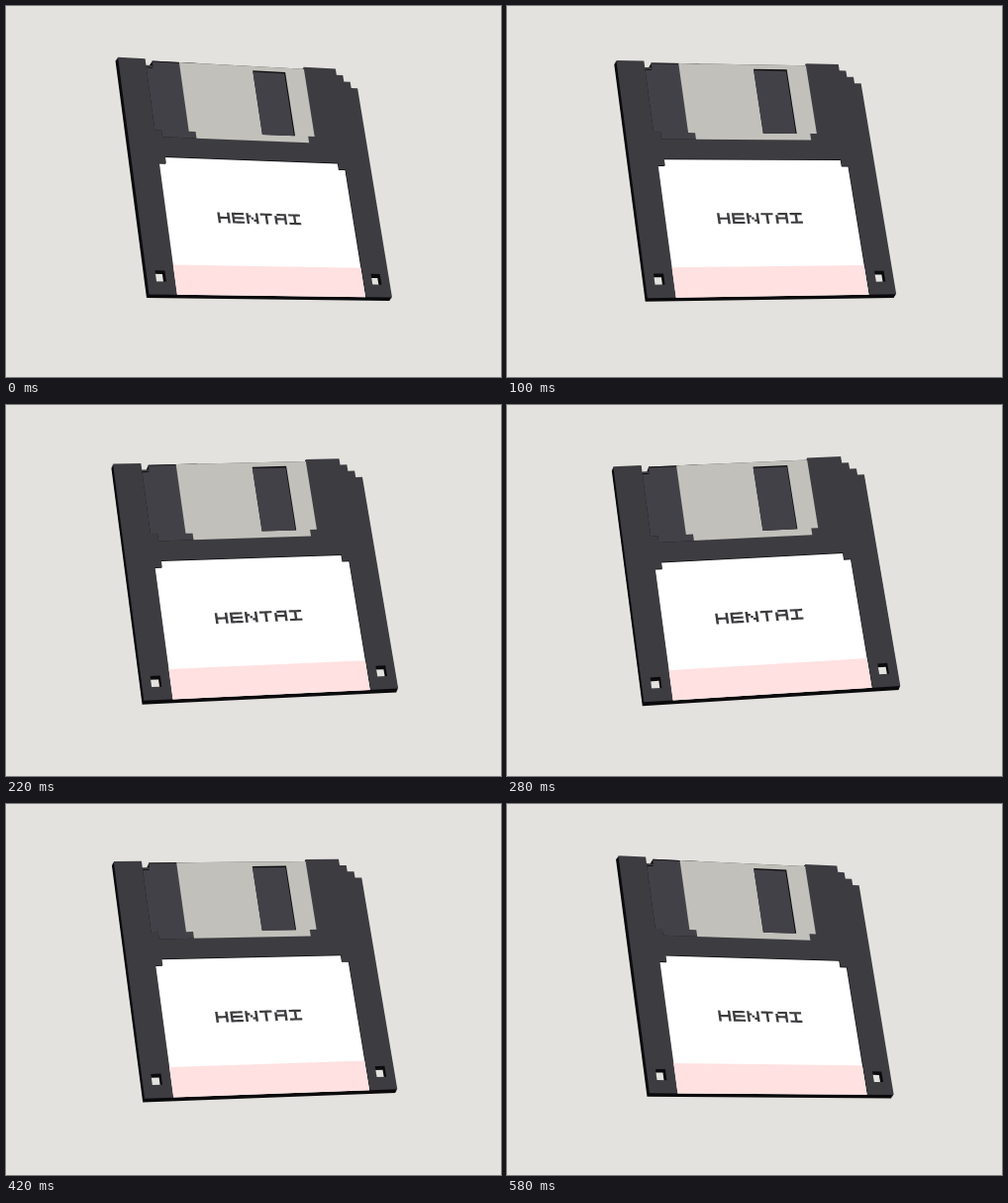
Recreate the animation shown at these times as an HTML page with a canvas. Size 500x375 px, loop 600 ms.

```html
<!DOCTYPE html>
<html lang="en">
<head>
<meta charset="utf-8">
<title>Floppy disk</title>
<style>
  html, body { margin: 0; width: 100%; height: 100%; overflow: hidden; background: #e3e2de; }
  canvas { display: block; width: 500px; height: 375px; }
</style>
</head>
<body>
<canvas id="stage" width="500" height="375" role="img" aria-label="Rocking floppy disk labelled HENTAI"></canvas>
<script>
const ctx = document.getElementById('stage').getContext('2d');
const LOOP = 600, STEP = 20;
const COLS = 36, ROWS = 35.5;
const BACKGROUND = '#e3e2de', PLASTIC = '#3d3c41', INNER = '#434148', SHADE = '#0b0b0d';

// Face corners (clockwise from top left) at both ends of the swing, and the offset to the back face.
const START = { corners: [[113, 51.7], [352, 64.5], [390, 294.5], [144.5, 291.5]], depth: [-2.5, 3.5] };
const END = { corners: [[107.3, 62.2], [357.6, 51.2], [397.3, 284], [138.3, 300.3]], depth: [-1.5, 4] };
const CENTER = [250, 175];

// A rectangle in grid cells; each corner is cut by a staircase of the given number of cells.
function stepped(left, top, right, bottom, cuts = [0, 0, 0, 0]) {
  const corners = [[left, top], [right, top], [right, bottom], [left, bottom]];
  const ways = [[0, -1], [1, 0], [0, 1], [-1, 0]];
  return corners.flatMap(([x, y], i) => {
    const [ix, iy] = ways[i], [ox, oy] = ways[(i + 1) % 4], n = cuts[i];
    const points = [];
    for (let k = 0; k <= n; k++) {
      const px = x - n * ix + k * (ix + ox), py = y - n * iy + k * (iy + oy);
      points.push([px, py]);
      if (k < n) points.push([px + ox, py + oy]);
    }
    return points;
  });
}

const [firstCorner, ...otherCorners] = stepped(0, 0, COLS, ROWS, [0, 3, 0, 0]);
const BODY = [firstCorner, [4, 0], [4, 1], [5, 1], [5, .3], [28, .3], [28, 0], ...otherCorners];
const RECESS = stepped(4, .3, 12, 12, [1, 0, 0, 1]);
const SHUTTER = stepped(9, .3, 28, 12, [0, 0, 1, 1]);
const WINDOW = stepped(20, 1, 25, 11);
const LABEL = stepped(4, 15, 32, ROWS, [1, 1, 0, 0]);
const STRIPE = stepped(4, 31, 32, ROWS);
const HOLES = [1.3, 33.3].map(x => stepped(x, 32, x + 1.4, 33.6));

// Which cells of a 5 by 5 letter are inked.
const INK = {
  H: (x, y) => x % 4 === 0 || y === 2,
  E: (x, y) => x === 0 || y % 2 === 0,
  N: (x, y) => x % 4 === 0 || x === y,
  T: (x, y) => x === 2 || y === 0,
  A: (x, y) => x + y > 0 && (x % 4 === 0 || y === 0 || y === 2),
  I: (x, y) => x === 2 || y % 4 === 0
};

function letterCells(text, left, top, width, height) {
  const cells = [];
  [...text].forEach((letter, i) => {
    for (let n = 0; n < 25; n++) {
      const x = n % 5, y = Math.floor(n / 5);
      if (!INK[letter](x, y)) continue;
      const u = left + (i * 6 + x) * width, v = top + y * height;
      cells.push(stepped(u, v, u + width, v + height));
    }
  });
  return cells;
}
const TITLE = letterCells('HENTAI', 11.5, 23.15, .353, .32);

const mix = (a, b, p) => a.map((n, i) => n + (b[i] - n) * p);

// Perspective map from grid cells to a quadrilateral.
function perspective([[x0, y0], [x1, y1], [x2, y2], [x3, y3]]) {
  const ax = x1 - x2, ay = y1 - y2, bx = x3 - x2, by = y3 - y2;
  const sx = x0 - x1 + x2 - x3, sy = y0 - y1 + y2 - y3;
  const det = ax * by - bx * ay;
  const g = (sx * by - bx * sy) / det, h = (ax * sy - sx * ay) / det;
  return ([col, row]) => {
    const u = col / COLS, v = row / ROWS, w = 1 + g * u + h * v;
    return [
      ((x1 - x0 + g * x1) * u + (x3 - x0 + h * x3) * v + x0) / w,
      ((y1 - y0 + g * y1) * u + (y3 - y0 + h * y3) * v + y0) / w
    ];
  };
}

function draw(time) {
  const p = (LOOP / 2 - Math.abs(time - LOOP / 2)) / 280;
  const swell = 1 + .018 * p * (1 - p);
  const project = perspective(START.corners.map((corner, i) =>
    mix(CENTER, mix(corner, END.corners[i], p), swell)));
  const [dx, dy] = mix(START.depth, END.depth, p);

  const fill = (shapes, color, depth = 0) => {
    ctx.beginPath();
    for (const shape of shapes) {
      shape.map(project).forEach(([x, y], i) =>
        ctx[i ? 'lineTo' : 'moveTo'](x + dx * depth, y + dy * depth));
      ctx.closePath();
    }
    ctx.fillStyle = color;
    ctx.fill();
  };
  // A sunken area: its floor is shifted along the depth, leaving shaded walls.
  const sink = (shape, depth, color, stripe) => {
    ctx.save();
    fill([shape], SHADE);
    ctx.clip();
    fill([shape], color, depth);
    if (stripe) fill([stripe], '#ffe1e1', depth);
    ctx.restore();
  };

  ctx.fillStyle = BACKGROUND;
  ctx.fillRect(0, 0, 500, 375);

  for (let d = 1; d > 0; d -= .25) fill([BODY], SHADE, d);
  fill([BODY], PLASTIC);
  sink(RECESS, .2, INNER);
  fill([SHUTTER], '#c1c0ba');
  sink(WINDOW, .35, INNER);
  sink(LABEL, .2, '#ffffff', STRIPE);
  HOLES.forEach(hole => sink(hole, 1, BACKGROUND));
  fill(TITLE, '#3d3c3f');
}

const begin = performance.now();
function tick() {
  const elapsed = (performance.now() - begin) % LOOP;
  draw(Math.floor(elapsed / STEP) * STEP);
  requestAnimationFrame(tick);
}
tick();
</script>
</body>
</html>
```
